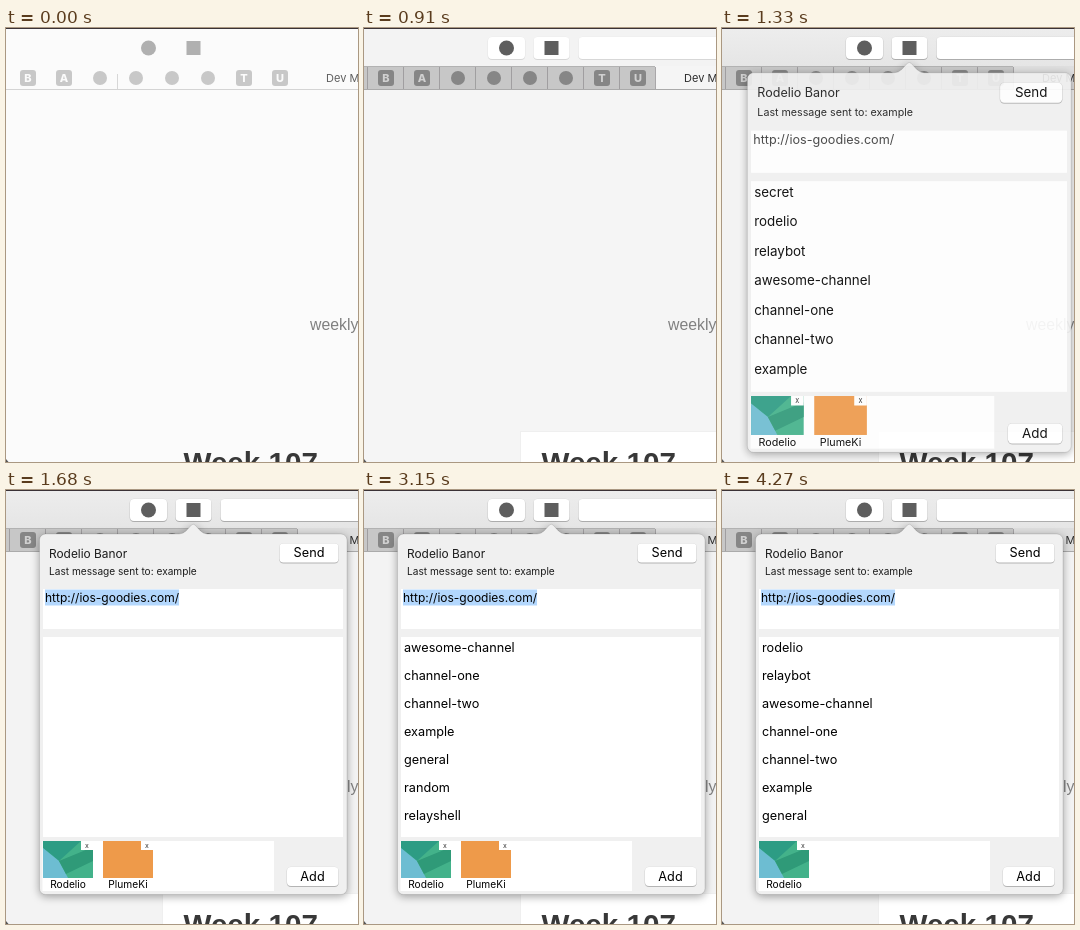
Recreate the animation shown at these times as an HTML page with a canvas. Size 352x434 px, loop 4.69 s.

```html
<!DOCTYPE html>
<html lang="en">
<head>
<meta charset="utf-8">
<title>Share popover</title>
<style>
  html, body { margin: 0; width: 100%; height: 100%; overflow: hidden; background: #fbfbfb; }
  canvas { display: block; width: 352px; height: 434px; }
</style>
</head>
<body>
<canvas id="stage"></canvas>
<script>
const W = 352, H = 434, LOOP = 4690, TICK = 70;
const UI = 'Inter, "Liberation Sans", sans-serif';
const WEB = '"Liberation Sans", Arial, sans-serif';
const ROWS = ['secret', 'rodelio', 'relaybot', 'awesome-channel', 'channel-one',
  'channel-two', 'example', 'general', 'random', 'relayshell'];
const ROW_H = 28;
// Popover pop-in, one entry per tick: scale and opacity
const POP = [[0.7, 0.15], [0.8, 0.36], [0.888, 0.6], [0.985, 0.8],
  [1.053, 0.91], [1.035, 0.97], [1.012, 1], [1, 1]];

const dpr = window.devicePixelRatio || 1;
const stage = document.getElementById('stage');
const layer = document.createElement('canvas');
for (const c of [stage, layer]) {
  c.width = W * dpr;
  c.height = H * dpr;
}
const screen = stage.getContext('2d');
const sheet = layer.getContext('2d');
let g = screen;

const clamp = v => Math.min(1, Math.max(0, v));
const ease = v => v * v * (3 - 2 * v);
const mix = (a, b, v) => a + (b - a) * v;
const grey = (a, b, v) => {
  const n = Math.round(mix(a, b, v));
  return `rgb(${n},${n},${n})`;
};

function rect(x, y, w, h, color) {
  g.fillStyle = color;
  g.fillRect(x, y, w, h);
}

function round(x, y, w, h, r, color) {
  g.fillStyle = color;
  g.beginPath();
  g.roundRect(x, y, w, h, r);
  g.fill();
}

function disc(x, y, r, color) {
  g.fillStyle = color;
  g.beginPath();
  g.arc(x, y, r, 0, Math.PI * 2);
  g.fill();
}

function poly(color, ...pts) {
  g.fillStyle = color;
  g.beginPath();
  pts.forEach(([x, y]) => g.lineTo(x, y));
  g.fill();
}

function text(str, x, y, size, color, { font = UI, weight = 400, align = 'left' } = {}) {
  g.font = `${weight} ${size}px ${font}`;
  g.textAlign = align;
  g.fillStyle = color;
  g.fillText(str, x, y);
}

function button(x, y, w, h, strength = 1) {
  g.save();
  g.globalAlpha *= strength;
  round(x - 0.5, y - 0.3, w + 1, h + 1.3, 4.5, 'rgba(0,0,0,.13)');
  round(x, y + 1, w, h, 4, 'rgba(0,0,0,.14)');
  g.restore();
  round(x, y, w, h, 4, `rgba(255,255,255,${strength > 0 ? 1 : 0})`);
}

function drawToolbar(active, focus) {
  const shade = g.createLinearGradient(0, 0, 0, 39);
  const base = mix(251, 243, active);
  shade.addColorStop(0, grey(base, 237, focus));
  shade.addColorStop(1, grey(base, 229, focus));
  rect(0, 0, W, 39, shade);
  rect(0, 0, W, 1, '#3a3236');
  const edge = active * mix(0.45, 1, focus);
  button(124, 9, 37, 22, edge);
  button(169.5, 9, 36, 22, edge);
  button(214.5, 9, 150, 22, edge);
  const ink = grey(176, 94, active);
  disc(142.5, 20, 7.5, ink);
  rect(180.5, 13, 14, 14, ink);
}

function drawTabs(active, focus) {
  rect(0, 38, W, 24, grey(251, 199, active));
  rect(0, 38, W, 1, grey(251, 178, active));
  rect(291, 38, 61, 23, grey(mix(251, 245, active), 222, focus));
  for (let x = 3; x <= 291; x += 36) {
    rect(x, 39, 1, 22, `rgba(150,148,150,${active * 0.8})`);
  }
  rect(111, 46, 1, 15, grey(215, 160, active));
  rect(0, 61, W, 1, grey(212, 170, active));
  const ink = grey(200, 134, active), hole = grey(251, 208, active);
  ['B', 'A', '', '', '', '', 'T', 'U'].forEach((letter, i) => {
    const x = 22 + i * 36;
    if (!letter) return disc(x, 50, 7, ink);
    round(x - 8, 42, 16, 16, 3, ink);
    text(letter, x, 54, 11, hole, { weight: 800, align: 'center' });
  });
  text('Dev Morsels', 320, 54, 11, grey(95, 45, active));
}

function drawPage(active, focus) {
  rect(0, 0, W, H, grey(mix(251, 245, active), 243, focus));
  g.save();
  g.globalAlpha = active;
  rect(156, 403, 200, 40, '#efefef');
  rect(157, 404, 200, 40, '#fff');
  g.restore();
  text('weekly', 304, 302, 15.8, '#808080', { font: WEB });
  text('Week 107', 177.5, 445, 29.6, '#383838', { font: WEB, weight: 700 });
  poly('#555', [0, 431], [2.5, 434], [0, 434]);
}

function bubble() {
  const l = 33.5, r = 341, t = 44, b = 404.5, k = 6;
  g.beginPath();
  g.moveTo(l + k, t);
  g.lineTo(173, t);
  g.quadraticCurveTo(177, t, 180, 41);
  g.lineTo(185.5, 35);
  g.quadraticCurveTo(187.2, 33.4, 189, 35);
  g.lineTo(194.5, 41);
  g.quadraticCurveTo(197.5, t, 201.5, t);
  g.arcTo(r, t, r, b, k);
  g.arcTo(r, b, l, b, k);
  g.arcTo(l, b, l, t, k);
  g.arcTo(l, t, r, t, k);
  g.closePath();
}

function closer(x) {
  rect(x + 38, 351, 12, 9, '#fff');
  text('x', x + 44, 357.5, 7, '#333', { align: 'center' });
}

function drawTray(both) {
  rect(36.5, 351, 231.5, 50, '#fff');
  rect(37, 351, 50, 37, '#43b28a');
  poly('#2d9c84', [37, 351], [75, 351], [53, 371], [37, 358]);
  poly('#6dbdd2', [37, 358], [53, 371], [62, 388], [37, 388]);
  poly('#2f9a78', [53, 371], [87, 357], [87, 371], [60, 384]);
  closer(37);
  text('Rodelio', 62, 398, 10.2, '#000', { align: 'center' });
  if (!both) return;
  rect(97, 351, 50, 37, '#ee9a4a');
  closer(97);
  text('PlumeKi', 122, 398, 10.2, '#000', { align: 'center' });
}

function drawList(scroll) {
  rect(37, 147, 300, 200, '#fff');
  if (scroll === null) return;
  g.save();
  g.beginPath();
  g.rect(37, 147, 300, 200);
  g.clip();
  ROWS.forEach((name, i) => {
    const y = 161.8 + i * ROW_H - scroll;
    if (y < 340 && y > 140) text(name, 40, y, 12.7, '#000');
  });
  g.restore();
}

function drawPopover(s) {
  g = sheet;
  g.setTransform(1, 0, 0, 1, 0, 0);
  g.clearRect(0, 0, layer.width, layer.height);
  g.scale(dpr, dpr);
  g.translate(187, 30);
  g.scale(s.scale, s.scale);
  g.translate(-187, -30);

  g.save();
  g.shadowColor = 'rgba(0,0,0,.36)';
  g.shadowBlur = 9 * dpr;
  g.shadowOffsetY = 2 * dpr;
  g.fillStyle = '#f0f0f0';
  bubble();
  g.fill();
  g.restore();
  g.strokeStyle = 'rgba(0,0,0,.16)';
  g.lineWidth = 0.7;
  bubble();
  g.stroke();

  text('Rodelio Banor', 43, 67.5, 11.9, '#1c1c1c');
  text('Last message sent to: example', 43, 85, 10.15, '#1c1c1c');
  button(273.5, 53.5, 59, 19);
  text('Send', 303, 67.4, 12.7, '#000', { align: 'center' });

  rect(37, 99, 300, 40, '#fff');
  const url = 'http://ios-goodies.com/';
  g.font = `400 12px ${UI}`;
  if (s.selected) rect(39, 99.5, g.measureText(url).width, 16, '#b3d7fd');
  text(url, 39, 111.5, 12, s.selected ? '#000' : '#3c3c3c');

  drawList(s.scroll);
  drawTray(s.both);
  button(281, 377, 51.5, 19);
  text('Add', 306.5, 391, 12.7, '#000', { align: 'center' });

  g = screen;
  g.save();
  g.setTransform(1, 0, 0, 1, 0, 0);
  g.globalAlpha = s.alpha;
  g.drawImage(layer, 0, 0);
  g.restore();
}

function scrollAt(t) {
  if (t < 1610) return 0;
  if (t < 1750) return null; // list reloads
  if (t < 3710) return 84 * ease(clamp((t - 1750) / 350));
  if (t < 4060) return mix(84, 56, ease(clamp((t - 3640) / 210)));
  return 28;
}

function render(now) {
  const t = Math.floor((now % LOOP) / TICK) * TICK;
  const active = t >= 910 ? 1 : 0.88 * ease(clamp(t / 560));
  const focus = clamp((t - 980) / 210);
  g = screen;
  g.setTransform(dpr, 0, 0, dpr, 0, 0);
  drawPage(active, focus);
  drawToolbar(active, focus);
  drawTabs(active, focus);
  if (t >= 1050) {
    const [scale, alpha] = POP[Math.min(POP.length - 1, (t - 1050) / TICK)];
    drawPopover({ scale, alpha, scroll: scrollAt(t), selected: t >= 1610, both: t < 3710 });
  }
}

const start = performance.now();
function loop() {
  render(performance.now() - start);
  requestAnimationFrame(loop);
}
loop();
</script>
</body>
</html>
```
